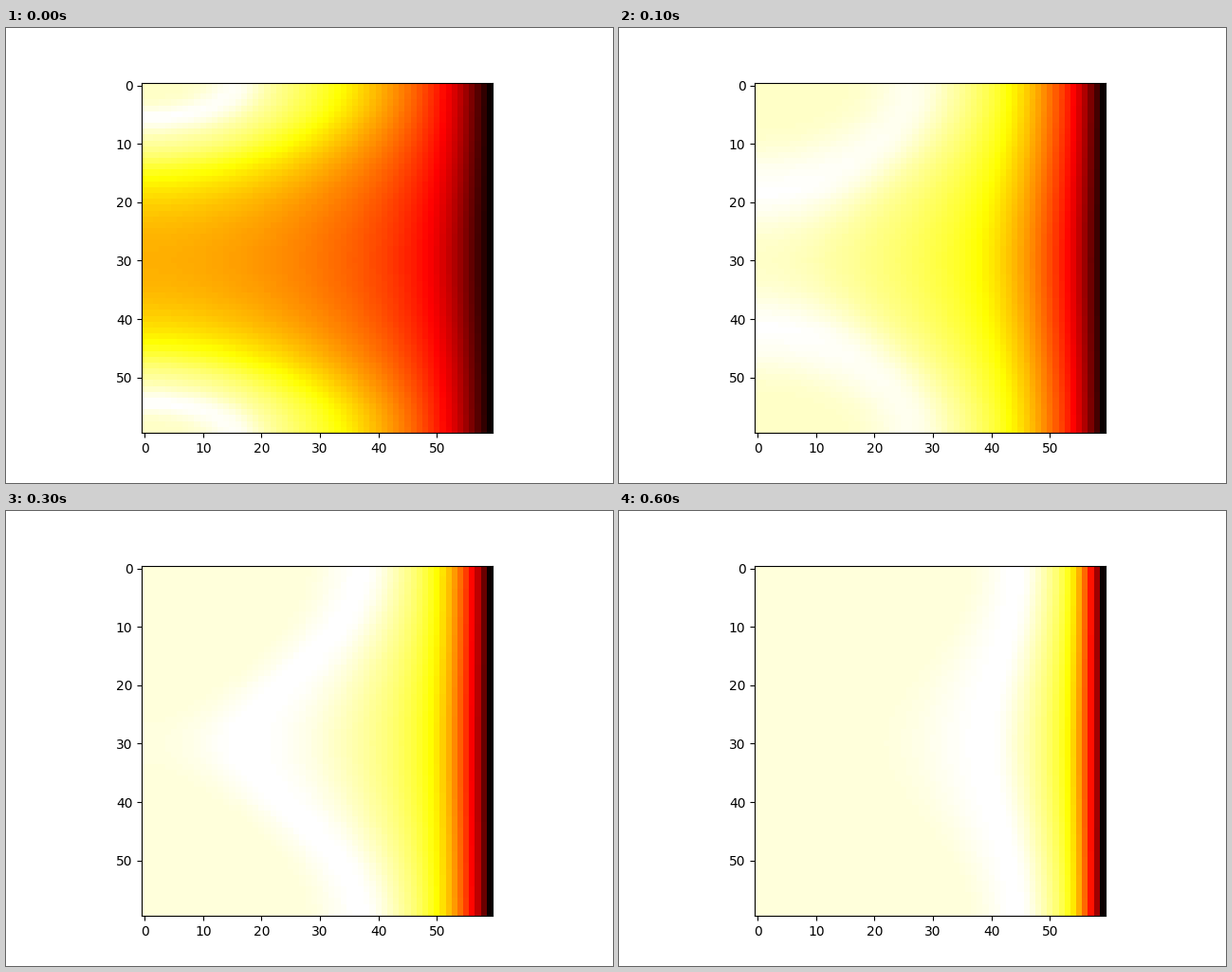
A matplotlib script for the animation above (0.62 s loop, 640 px wide and 480 px high).

```python
import numpy as np
import matplotlib.pyplot as plt
from matplotlib.animation import FuncAnimation

SIZE = 60
EDGE = SIZE - 1
FRAMES = 31

# Each front closes in on the cold right edge as start * (1 + rate * n) ** -power.
# (start, rate, power) along the top row, then along the middle row.
FRONTS = {
    "plateau": [(53, 0.04, 1), (116, 0.0095, 4)],
    "crest": [(44, 0.067, 1), (111, 0.018, 4)],
    "pale": [(37, 0.1, 1), (97, 0.24, 1)],
    "yellow": [(25.5, 0.122, 1), (89, 1.15, 0.75)],
    "red": [(7.5, 0.105, 1), (10.5, 0.16, 1)],
}
PALE, YELLOW, RED, BLACK = 0.9, 0.746, 0.365, 0


def smooth(x, xs, ys):
    """Monotone cubic interpolation, clamped at both ends."""
    xs, ys = np.asarray(xs, float), np.asarray(ys, float)
    h = np.diff(xs)
    d = np.diff(ys) / h
    m = np.zeros(len(xs))
    same = d[:-1] * d[1:] > 0
    a, b = d[:-1][same], d[1:][same]
    m[1:-1][same] = 2 * a * b / (a + b)
    m[-1] = d[-1] + (d[-1] - d[-2]) * h[-1] / (h[-1] + h[-2])
    x = np.clip(x, xs[0], xs[-1])
    i = np.clip(np.searchsorted(xs, x, side="right") - 1, 0, len(h) - 1)
    s = (x - xs[i]) / h[i]
    return ((1 + 2 * s) * (1 - s) ** 2 * ys[i]
            + s * (1 - s) ** 2 * h[i] * m[i]
            + s * s * (3 - 2 * s) * ys[i + 1]
            + s * s * (s - 1) * h[i] * m[i + 1])


def fronts(row, n):
    """Signed squares of the front columns, so fronts meet the left edge squarely."""
    start, rate, power = np.array([front[row] for front in FRONTS.values()]).T
    cols = EDGE - start * (1 + rate * n) ** -power
    return cols * np.abs(cols)


def field(n):
    top, middle = fronts(0, n), fronts(1, n)
    settle = np.clip((n - 11) / 4, 0, 1)
    plateau = 0.945 + 0.017 * settle
    fade = 0.0007 * (1 - settle)
    u = np.arange(SIZE) ** 2.0
    plate = np.empty((SIZE, SIZE))
    for y in range(SIZE):
        w = (1 + np.cos(2 * np.pi * y / SIZE)) / 2
        knots = np.append(middle + (top - middle) * w, EDGE ** 2)
        crest = 1 - fade * np.sqrt(max(knots[1], 0))
        plate[y] = smooth(u, knots, [plateau, crest, PALE, YELLOW, RED, BLACK])
    return plate


fig, ax = plt.subplots(figsize=(6.4, 4.8), dpi=100)
image = ax.imshow(field(0), cmap="hot", vmin=0, vmax=1)


def update(n):
    image.set_data(field(n))
    return [image]


anim = FuncAnimation(fig, update, frames=FRAMES, interval=20, repeat=True,
                     repeat_delay=0)
plt.show()
```
